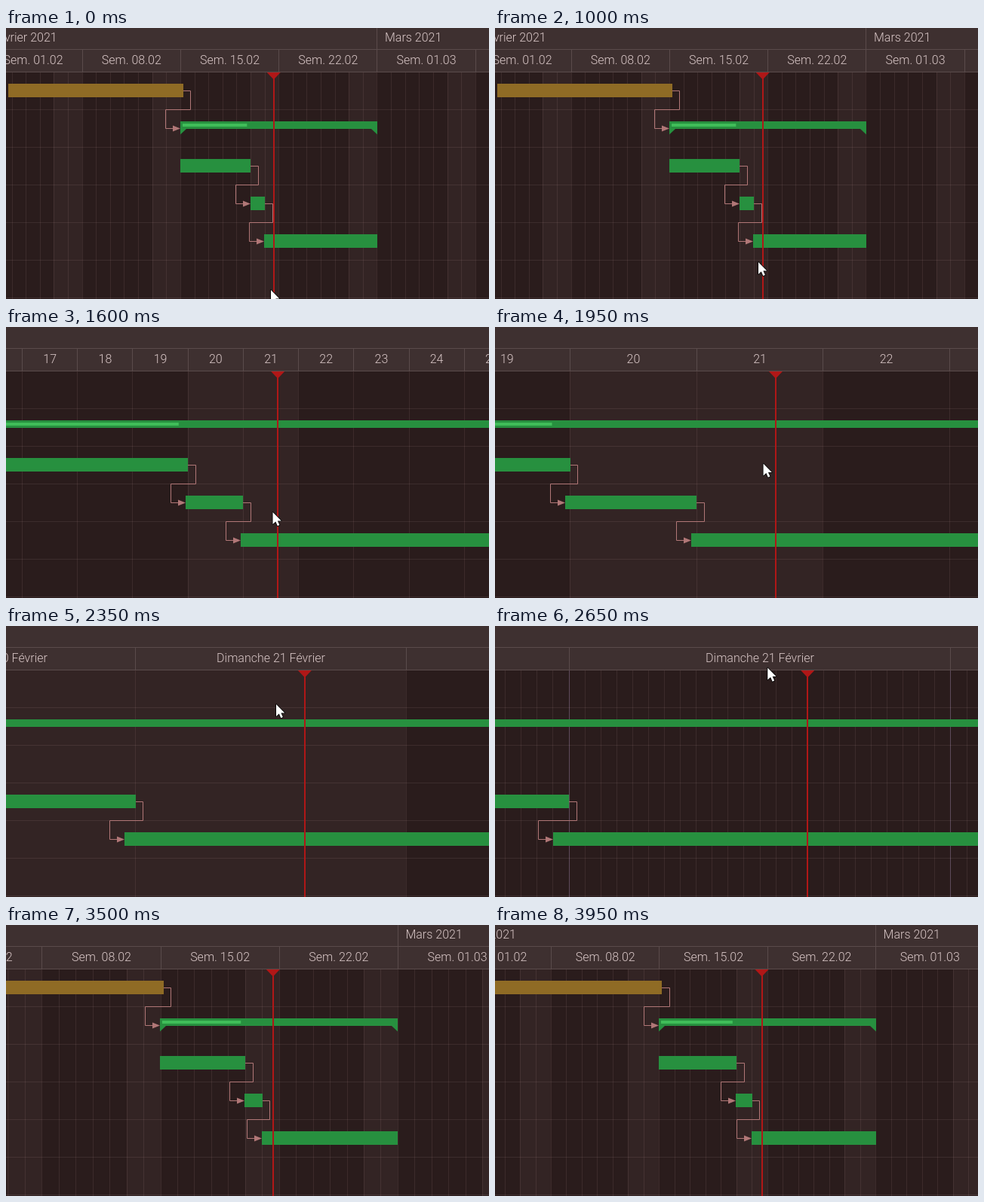
Write an HTML page with a canvas that moves like this. It is 640 px wide and 360 px high and loops after 4.5 s.

```html
<!DOCTYPE html>
<html lang="fr">
<head>
<meta charset="utf-8">
<title>Gantt zoom</title>
<style>
  html, body { margin: 0; width: 100%; height: 100%; overflow: hidden; background: #2a1c1c; }
  canvas { display: block; width: 640px; height: 360px; }
</style>
</head>
<body>
<canvas id="stage" width="640" height="360"></canvas>
<script>
const W = 640, H = 360, LOOP = 4500, STEP = 50;
const ctx = document.getElementById('stage').getContext('2d');

const COLOR = {
  back: '#2a1c1c', weekend: '#332424', grid: 'rgba(255,205,205,.085)', dayEdge: '#5d4a5a',
  head: '#3e3030', rule: '#5a4b4b', text: '#d8c6c6',
  gold: '#8f6b25', green: '#27903f', progress: '#40bd59',
  link: '#b17777', now: '#b01717'
};

const MONTHS = ['Janvier', 'Février', 'Mars', 'Avril', 'Mai', 'Juin', 'Juillet',
  'Août', 'Septembre', 'Octobre', 'Novembre', 'Décembre'];
const DAYS = ['Dimanche', 'Lundi', 'Mardi', 'Mercredi', 'Jeudi', 'Vendredi', 'Samedi'];

// Days are counted from Monday 1 February 2021.
const EPOCH = Date.UTC(2021, 1, 1), DAY = 864e5, HOUR = 1 / 24;
const FOCUS = 20.5, NOW = 20.625;

const TASKS = [
  { from: 1.725, to: 14 + 4 * HOUR, color: COLOR.gold },
  { from: 14 - HOUR, to: 28, color: COLOR.green, done: 0.35 },
  { from: 14 - HOUR, to: 19, color: COLOR.green },
  { from: 19 - HOUR, to: 20, color: COLOR.green },
  { from: 20 - HOUR, to: 28, color: COLOR.green }
];
const LINKS = [[0, 1], [2, 3], [3, 4]];

// Smooth monotone curve through [time, value] points.
function curve(points) {
  const last = points.length - 1;
  const rate = i => (points[i + 1][1] - points[i][1]) / (points[i + 1][0] - points[i][0]);
  const slope = points.map((p, i) => {
    if (i === 0 || i === last) return 0;
    const a = rate(i - 1), b = rate(i);
    return a * b > 0 ? 2 * a * b / (a + b) : 0;
  });
  return t => {
    if (t <= points[0][0]) return points[0][1];
    if (t >= points[last][0]) return points[last][1];
    let i = 0;
    while (t >= points[i + 1][0]) i++;
    const [t0, a] = points[i], [t1, b] = points[i + 1];
    const h = t1 - t0, u = (t - t0) / h, v = 1 - u;
    return a * v * v * (1 + 2 * u) + b * u * u * (3 - 2 * u)
      + h * u * v * (slope[i] * v - slope[i + 1] * u);
  };
}

const zoom = curve([[1000, 18.61], [1600, 73.2], [2350, 359], [2900, 575], [3200, 575],
  [3500, 22.46], [3600, 21.3], [3850, 21.3], [3950, 20.48]].map(([t, s]) => [t, Math.log(s)]));
const centre = curve([[1000, 352.4], [1600, 351]]);
const cursorX = curve([[500, 351], [1000, 349], [1600, 353.5], [2350, 358], [2900, 363], [3200, 363], [3500, 356]]);
const cursorY = curve([[500, 348], [1000, 311], [1600, 246], [2350, 104], [2900, 35], [3200, 35], [3500, 380]]);

function rect(x, y, w, h, color) {
  ctx.fillStyle = color;
  ctx.fillRect(x, y, w, h);
}

function shape(color, ...pts) {
  ctx.beginPath();
  pts.forEach(p => ctx.lineTo(p[0], p[1]));
  ctx.closePath();
  ctx.fillStyle = color;
  ctx.fill();
}

function label(text, x, y, align) {
  ctx.font = '300 16px Roboto, sans-serif';
  ctx.textAlign = align;
  ctx.fillStyle = COLOR.text;
  ctx.fillText(text, x, y);
}

const vline = (x, y, h, color) => rect(Math.floor(x), y, 1, h, color);
const dateOf = d => new Date(EPOCH + d * DAY);
const two = n => String(n).padStart(2, '0');

function drawGrid(view) {
  const { px, first, end, scale } = view;
  const hours = scale >= 480;
  for (let d = first; d <= end; d++) {
    const x = Math.floor(px(d));
    const weekday = dateOf(d).getUTCDay();
    if (!hours && weekday % 6 === 0) rect(x, 59, Math.floor(px(d + 1)) - x, H, COLOR.weekend);
    if (hours) for (let h = 1; h < 24; h++) vline(px(d + h * HOUR), 59, H, COLOR.grid);
  }
  for (let d = first; d <= end; d++) vline(px(d), 59, H, hours ? COLOR.dayEdge : COLOR.grid);
  for (let y = 108; y < H; y += 50) rect(0, y, W, 1, COLOR.grid);
}

function drawHeader(view) {
  const { px, first, end, scale } = view;
  rect(0, 0, W, 59, COLOR.head);
  rect(0, 28, W, 1, COLOR.rule);
  rect(0, 58, W, 1, COLOR.rule);

  for (let m = 0; m < 4; m++) {
    const x = px((Date.UTC(2021, m, 1) - EPOCH) / DAY);
    vline(x, 0, 28, COLOR.rule);
    label(MONTHS[m] + ' 2021', x + 10, 18, 'left');
  }

  const span = scale < 35 ? 7 : 1;
  for (let d = Math.floor(first / span) * span; d <= end; d += span) {
    const date = dateOf(d), n = date.getUTCDate(), m = date.getUTCMonth();
    const text = span === 7 ? `Sem. ${two(n)}.${two(m + 1)}`
      : scale < 170 ? String(n)
      : `${DAYS[date.getUTCDay()]} ${n} ${MONTHS[m]}`;
    vline(px(d), 29, 29, COLOR.rule);
    label(text, px(d + span / 2), 48, 'center');
  }
}

function drawTasks(px) {
  TASKS.forEach((task, i) => {
    const a = Math.round(px(task.from)), b = Math.round(px(task.to)), y = 74 + i * 50;
    if (!task.done) return rect(a, y, b - a, 18, task.color);
    rect(a, y, b - a, 10, task.color);
    shape(task.color, [a, y + 10], [a + 8, y + 10], [a, y + 17.5]);
    shape(task.color, [b, y + 10], [b - 8, y + 10], [b, y + 17.5]);
    rect(a + 3, y + 3, (b - a) * task.done - 6, 4, COLOR.progress);
  });
}

function drawLinks(px) {
  ctx.strokeStyle = COLOR.link;
  ctx.lineWidth = 1;
  for (const [i, j] of LINKS) {
    const out = px(TASKS[i].to), into = Math.round(px(TASKS[j].from));
    const right = Math.floor(out + 10) + 0.5, left = into - 19.5;
    const y0 = 83.5 + i * 50, y1 = 83.5 + j * 50, mid = y0 + 25;
    ctx.beginPath();
    [[Math.round(out), y0], [right, y0], [right, mid], [left, mid], [left, y1], [into - 9, y1]]
      .forEach(p => ctx.lineTo(p[0], p[1]));
    ctx.stroke();
    shape(COLOR.link, [into - 10, y1 - 4], [into, y1], [into - 10, y1 + 4]);
  }
}

function drawNow(x) {
  rect(Math.round(x) - 1, 59, 2, H, COLOR.now);
  shape(COLOR.now, [x - 9, 59], [x + 9, 59], [x, 68.5]);
}

function drawCursor(x, y) {
  ctx.save();
  ctx.translate(x, y);
  ctx.beginPath();
  [[0, 0], [0, 16], [3.8, 12.6], [6.3, 18.2], [8.9, 17], [6.4, 11.5], [11.3, 11.5]]
    .forEach(p => ctx.lineTo(p[0], p[1]));
  ctx.closePath();
  ctx.lineJoin = 'round';
  ctx.lineWidth = 1.6;
  ctx.strokeStyle = '#000';
  ctx.stroke();
  ctx.fillStyle = '#fff';
  ctx.fill();
  ctx.restore();
}

function draw(t) {
  const scale = Math.exp(zoom(t)), c = centre(t < 3200 ? t : 3200);
  const px = d => c + (d - FOCUS) * scale;
  const view = {
    px, scale,
    first: Math.floor(FOCUS - c / scale),
    end: Math.ceil(FOCUS + (W - c) / scale)
  };
  rect(0, 0, W, H, COLOR.back);
  drawGrid(view);
  drawHeader(view);
  drawTasks(px);
  drawLinks(px);
  drawNow(px(NOW));
  if (cursorY(t) < H) drawCursor(cursorX(t), cursorY(t));
}

const start = performance.now();
function tick() {
  const t = (performance.now() - start) % LOOP;
  draw(Math.floor(t / STEP) * STEP);
  requestAnimationFrame(tick);
}
tick();
</script>
</body>
</html>
```
